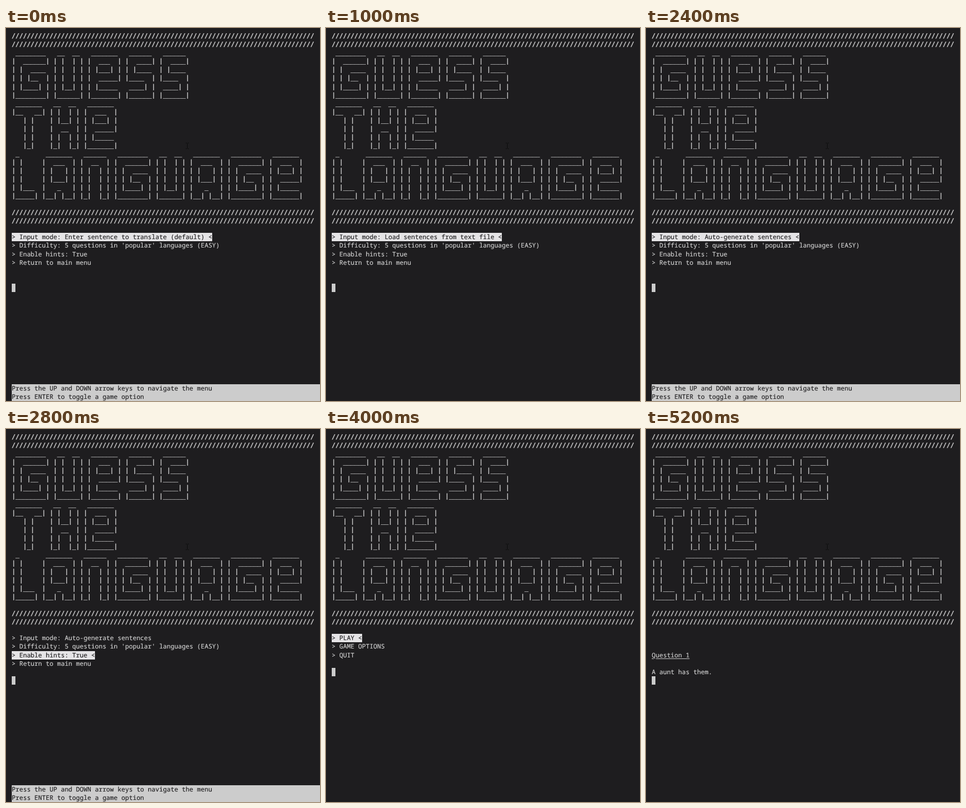
Recreate the animation shown at these times as an HTML page. Size 600 px wide and 712 px high, loop 8000 ms.

```html
<!DOCTYPE html>
<html lang="en">
<head>
<meta charset="utf-8">
<title>Guess the language</title>
<style>
  html, body { margin: 0; width: 100%; height: 100%; overflow: hidden; background: #1e1d1f; }
  #term {
    position: relative; width: 600px; height: 712px; overflow: hidden;
    font: 12px/16.05px "Noto Sans Mono", monospace;
    letter-spacing: .024px; color: #d4d4d4;
    -webkit-text-stroke: .15px;
    text-rendering: geometricPrecision; font-kerning: none; font-variant-ligatures: none;
  }
  .row { position: absolute; left: 11px; height: 16.05px; white-space: pre; }
  #head {
    position: absolute; top: 1px; left: 0;
    font-family: "DejaVu Sans Mono", monospace; letter-spacing: 0;
    -webkit-text-stroke: .4px;
  }
  .on { background: #e5e4e6; color: #1e1d1f; }
  .foot { background: #ccc; color: #1e1d1f; right: 0; }
  .title { text-decoration: underline; text-underline-offset: 2px; }
  .cursor { width: 7.2px; background: #ccc; }
  #mouse { position: absolute; left: 342px; top: 218px; }
</style>
</head>
<body>
<div id="term">
  <div id="head"></div>
  <div id="body"></div>
  <svg id="mouse" width="9" height="14" fill="none" stroke="#0a0a0a">
    <path d="M1.5 1.5H3.5L4.5 2.5L5.5 1.5H7.5M4.5 2.5V11.5M1.5 12.5H3.5L4.5 11.5L5.5 12.5H7.5"/>
  </svg>
</div>
<script>
const TOP = 6.2, ROW = 16.05, LOOP = 8000;

const glyphs = {
  G: [' ________ ', '|  ______|', '| |  ____ ', '| | |__  |', '| |____| |', '|________|'],
  U: [' __  __ ', '| |  | |', '| |  | |', '| |  | |', '| |__| |', '|______|'],
  E: [' _______ ', '|  ___  |', '| |___| |', '|  _____|', '| |_____ ', '|_______|'],
  S: [' ______ ', '|  ____|', '| |____ ', '|____  |', ' ____| |', '|______|'],
  T: [' _______ ', '|__   __|', '   | |   ', '   | |   ', '   | |   ', '   |_|   '],
  H: [' __  __ ', '| |  | |', '| |__| |', '|  __  |', '| |  | |', '|_|  |_|'],
  L: [' _     ', '| |    ', '| |    ', '| |    ', '| |___ ', '|_____|'],
  A: [' _______ ', '|  ___  |', '| |   | |', '| |___| |', '|   _   |', '|__| |__|'],
  N: [' ______ ', '|  __  |', '| |  | |', '| |  | |', '| |  | |', '|_|  |_|']
};

function put(parent, row, text, cls = '') {
  const el = document.createElement('div');
  el.className = 'row ' + cls;
  el.style.top = TOP + row * ROW + 'px';
  el.textContent = text;
  parent.append(el);
}

const head = document.getElementById('head');
const body = document.getElementById('body');

for (const row of [0, 1, 21, 22]) put(head, row, '/'.repeat(80));
['GUESS', 'THE', 'LANGUAGE'].forEach((word, w) => {
  for (let i = 0; i < 6; i++)
    put(head, 2 + w * 6 + i, [...word].map(c => glyphs[c][i]).join(' '));
});

const options = mode => [
  'Input mode: ' + mode,
  "Difficulty: 5 questions in 'popular' languages (EASY)",
  'Enable hints: True',
  'Return to main menu'
];
const typed = options('Enter sentence to translate (default)');
const loaded = options('Load sentences from text file');
const auto = options('Auto-generate sentences');
const main = ['PLAY', 'GAME OPTIONS', 'QUIT'];
const toggle = 'Press ENTER to toggle a game option';
const choose = 'Press ENTER to select a menu option';

// start time, menu items, selected item, cursor row, last footer line
const screens = [
  [0, typed, 0, 30, toggle],
  [1000, loaded, 0, 30],
  [1400, auto, 0, 30, toggle],
  [2600, auto, 1, 29, toggle],
  [2800, auto, 2, 29, toggle],
  [3000, auto, 3, 29, toggle],
  [3400, main, 1, 29],
  [3600, main, 1, 29, choose],
  [4000, main, 0, 28],
  [4200, main, 0, 28, choose],
  [4400, null, 0, 29]
];

function draw([, items, picked, cursor, hint]) {
  body.replaceChildren();
  if (items) {
    items.forEach((item, i) => {
      const on = i === picked;
      put(body, 24 + i, '> ' + item + (on ? ' <' : ''), on ? 'on' : '');
    });
  } else {
    put(body, 26, 'Question 1', 'title');
    put(body, 28, 'A aunt has them.');
  }
  put(body, cursor, '', 'cursor');
  if (hint) {
    put(body, 42, 'Press the UP and DOWN arrow keys to navigate the menu', 'foot');
    put(body, 43, hint, 'foot');
  }
}

const start = performance.now();
let shown;
function tick() {
  const t = Math.max(0, performance.now() - start) % LOOP;
  const screen = screens.findLast(s => s[0] <= t);
  if (screen !== shown) draw(shown = screen);
  requestAnimationFrame(tick);
}
tick();
</script>
</body>
</html>
```
